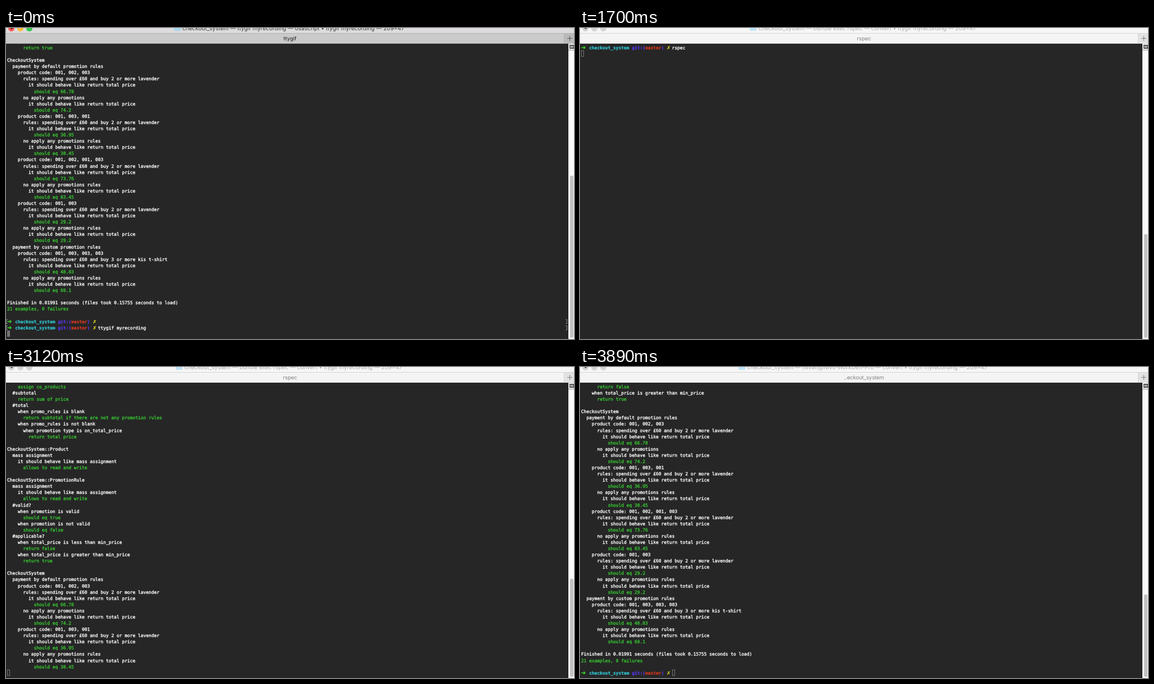
An HTML page that plays this animation: 1010 px wide and 554 px high, repeating every 5170 ms.

```html
<!DOCTYPE html>
<html lang="en">
<head>
<meta charset="utf-8">
<title>rspec run</title>
<style>
  :root { --cw: 4.756px; }
  html, body { margin: 0; width: 100%; height: 100%; overflow: hidden; background: #262626; }
  body { text-rendering: geometricPrecision; }
  #win { position: absolute; left: 0; top: 0; width: 1010px; height: 554px; overflow: hidden;
    --bar: #f6f6f6; --tab: #f4f4f4; --edge: #d6d6d6; --plus: #e2e2e2; --title: #acacac; --label: #808080; --cross: #7d7d7d;
    --red: #d3d3d3; --amber: #d3d3d3; --lime: #d3d3d3; --folder: #bfe4f6; }
  #win.active { --bar: #dddbdd; --tab: #cacaca; --edge: #b2b2b2; --plus: #bababa; --title: #3c3c3c; --label: #1c1c1c; --cross: #505050;
    --red: #fc5b57; --amber: #fdbd3f; --lime: #35c84b; --folder: #a9d6ee; }
  #win div, #win i { position: absolute; box-sizing: border-box; }

  #bar { left: 0; top: 0; width: 1010px; height: 9px; background: var(--bar); overflow: hidden; }
  .light { top: -5.5px; width: 11px; height: 11px; border-radius: 50%; }
  #dot { left: 8px; top: -2px; width: 4px; height: 4px; border-radius: 50%; background: #4a1714; }
  #win:not(.active) #dot { background: #555; }
  #win #head { left: 0; top: -5px; width: 1007px; display: flex; justify-content: center; gap: 3px;
    font: 10px/12px Inter, "Liberation Sans", sans-serif; white-space: pre; color: var(--title); }
  #win #head i { position: relative; width: 12px; height: 10px; border-radius: 1px; background: var(--folder); }
  #tab { left: 0; top: 9px; width: 1010px; height: 19px; background: var(--tab); border: solid var(--edge); border-width: 1px 0;
    font: 9.4px/19px Inter, "Liberation Sans", sans-serif; text-align: center; color: var(--label); }
  #plus { left: 992px; top: 9px; width: 18px; height: 19px; background: var(--plus); border: 1px solid var(--edge); border-right: 0; }
  #plus i { background: var(--cross); }

  #term { left: 0; top: 27.5px; width: 1000px; height: 526.5px; background: #262626; overflow: hidden;
    font: 7.9px/11px "DejaVu Sans Mono", "Noto Sans Mono", monospace; color: #fff; -webkit-text-stroke: .35px; }
  .line { left: 2px; width: 996px; height: 11px; white-space: pre; }
  .green { color: #37c932; }
  .line b { color: #32cddb; -webkit-text-stroke: .2px; }
  .line b.git { color: #5a38f4; }
  .line b.branch { color: #dd391f; }
  #win .arrow, #win .dirty { font-family: "DejaVu Sans", sans-serif; font-style: normal; font-weight: bold; }
  #win .arrow { left: 0; font-size: 10px; color: #36d02a; }
  #win .dirty { left: calc(32 * var(--cw)); color: #d3cf22; }
  #win .mark { top: 1px; width: 3px; height: 8px; border: 1px solid #858585; }
  #win .open { left: -2px; border-right: 0; }
  #win .close { left: 993px; border-left: 0; }
  #term:not(.marked) .mark { display: none; }
  #cursor { width: 5px; height: 11px; border: 1px solid #747474; }
  .active #cursor { background: #747474; }

  #track { left: 1000px; top: 27.5px; width: 10px; height: 526.5px; background: #fafafa; }
  #split { left: 1000px; top: 28px; width: 10px; height: 12px; background: #efefef; border-bottom: 1px solid #9d9d9d; }
  #split i { left: 2px; top: 2px; width: 8px; height: 7px; border: 1px solid #444; background: linear-gradient(#777 2px, #e4e4e4 2px, #e4e4e4 3px, #777 3px); }
  #thumb { left: 1003px; width: 6px; border-radius: 3px; background: #c1c1c1; }
</style>
</head>
<body>
<div id="win">
  <div id="bar">
    <div class="light" style="left:4px;background:var(--red)"></div>
    <div class="light" style="left:20px;background:var(--amber)"></div>
    <div class="light" style="left:36px;background:var(--lime)"></div>
    <div id="dot"></div>
    <div id="head"><i></i><span id="title"></span></div>
  </div>
  <div id="tab"></div>
  <div id="plus"><i style="left:5px;top:8px;width:9px;height:1px"></i><i style="left:9px;top:4px;width:1px;height:9px"></i></div>
  <div id="term"><div id="cursor"></div></div>
  <div id="track"></div>
  <div id="split"><i></i></div>
  <div id="thumb"></div>
</div>
<script>
const LOOP = 5170, ROWS = 47, PITCH = 11.08, CELL = 4.756, PROMPT = 34;
const $ = id => document.getElementById(id);

const mass = `  mass assignment
    it should behave like mass assignment
      allows to read and write`;
const outcome = price => `        it should behave like return total price
          should eq ${price}`;
const cart = (codes, offer, price, plainTitle, plainPrice) => `    product code: ${codes}
      rules: spending over £60 and buy ${offer}
${outcome(price)}
      no apply any ${plainTitle}
${outcome(plainPrice)}`;
const lavender = '2 or more lavender', plain = 'promotions rules';

const output = `
CheckoutSystem::Checkout
${mass}
  #scan
    assign co_products
  #subtotal
    return sum of price
  #total
    when promo_rules is blank
      return subtotal if there are not any promotion rules
    when promo_rules is not blank
      when promotion type is on_total_price
        return total price

CheckoutSystem::Product
${mass}

CheckoutSystem::PromotionRule
${mass}
  #valid?
    when promotion is valid
      should eq true
    when promotion is not valid
      should eq false
  #applicable?
    when total_price is less than min_price
      return false
    when total_price is greater than min_price
      return true

CheckoutSystem
  payment by default promotion rules
${cart('001, 002, 003', lavender, '66.78', 'promotions', '74.2')}
${cart('001, 003, 001', lavender, '36.95', plain, '38.45')}
${cart('001, 002, 001, 003', lavender, '73.76', plain, '83.45')}
${cart('001, 003', lavender, '29.2', plain, '29.2')}
  payment by custom promotion rules
${cart('001, 003, 003, 003', '3 or more kis t-shirt', '48.83', plain, '69.1')}

Finished in 0.01991 seconds (files took 0.15755 seconds to load)
21 examples, 0 failures
`.split('\n');

const prompt = command => '<i class="mark open"></i><i class="arrow">➜</i>   <b>checkout_system</b> ' +
  '<b class="git">git:(</b><b class="branch">master</b><b class="git">)</b><i class="dirty">✗</i>   ' +
  `<span class="command">${command}</span><i class="mark close"></i>`;
const isResult = text => /^\s*(allows|assign|return|should|21 ex)/.test(text);

const lines = [prompt('rspec'), ...output, prompt(''), prompt('ttygif myrecording')].map(html => {
  const el = document.createElement('div');
  el.className = isResult(html) ? 'line green' : 'line';
  el.innerHTML = html;
  $('term').append(el);
  return el;
});
const typed = lines[0].querySelector('.command');

const titleOf = job => `checkout_system — ${job} • ttygif myrecording — 209×47`;
const host = 'nilvari@Nivs-WorkDen-Pro';
const record = { tab: 'ttygif', title: titleOf('ttygif myrecording — osascript') };
const shell = { tab: '..eckout_system', title: titleOf(host + ' — sh') };
const convert = { tab: '..eckout_system', title: titleOf(host + ' — convert') };
const rspec = { tab: 'rspec', title: titleOf('bundle exec rspec — convert') };

// time, window heading, cursor line, cursor column, window has focus
const steps = [
  [0, record, 81, 0, true],
  [220, convert, 0, 0],
  [400, convert, 0, PROMPT],
  [830, shell, 0, PROMPT],
  [1110, shell, 0, PROMPT + 1],
  [1270, convert, 0, PROMPT + 2],
  [1360, convert, 0, PROMPT + 3],
  [1460, convert, 0, PROMPT + 5],
  [1700, rspec, 1, 0],
  [2320, rspec, 7, 0, true],
  ...[10, 13, 21, 29, 37, 43, 46, 53, 60].map((line, i) => [2420 + i * 100, rspec, line, 0]),
  [3320, rspec, 67, 0, true],
  [3420, rspec, 72, 0],
  [3520, rspec, 75, 0],
  [3620, convert, 79, 0],
  [3890, convert, 79, PROMPT]
];

const rowTop = row => 2.5 + row * PITCH;

function show([, heading, line, col, active]) {
  const top = Math.max(0, line - ROWS + 1);
  const history = heading === record ? 48 : 130;
  $('win').classList.toggle('active', !!active);
  $('term').classList.toggle('marked', heading === record);
  $('title').textContent = heading.title;
  $('tab').textContent = heading.tab;
  typed.textContent = line ? 'rspec' : 'rspec'.slice(0, Math.max(0, col - PROMPT));
  lines.forEach((el, i) => {
    const visible = i >= top && (i < line || (i === line && col > 0));
    el.style.display = visible ? '' : 'none';
    el.style.top = rowTop(i - top) + 'px';
  });
  $('cursor').style.left = 2 + col * CELL + 'px';
  $('cursor').style.top = rowTop(line - top) - 0.6 + 'px';
  const size = 511 * ROWS / (history + top);
  $('thumb').style.top = 552 - size + 'px';
  $('thumb').style.height = size + 'px';
}

const start = performance.now();
let current;
function tick() {
  const time = (performance.now() - start) % LOOP;
  const step = steps.findLast(s => s[0] <= time);
  if (step !== current) show(current = step);
  requestAnimationFrame(tick);
}
tick();
</script>
</body>
</html>
```
